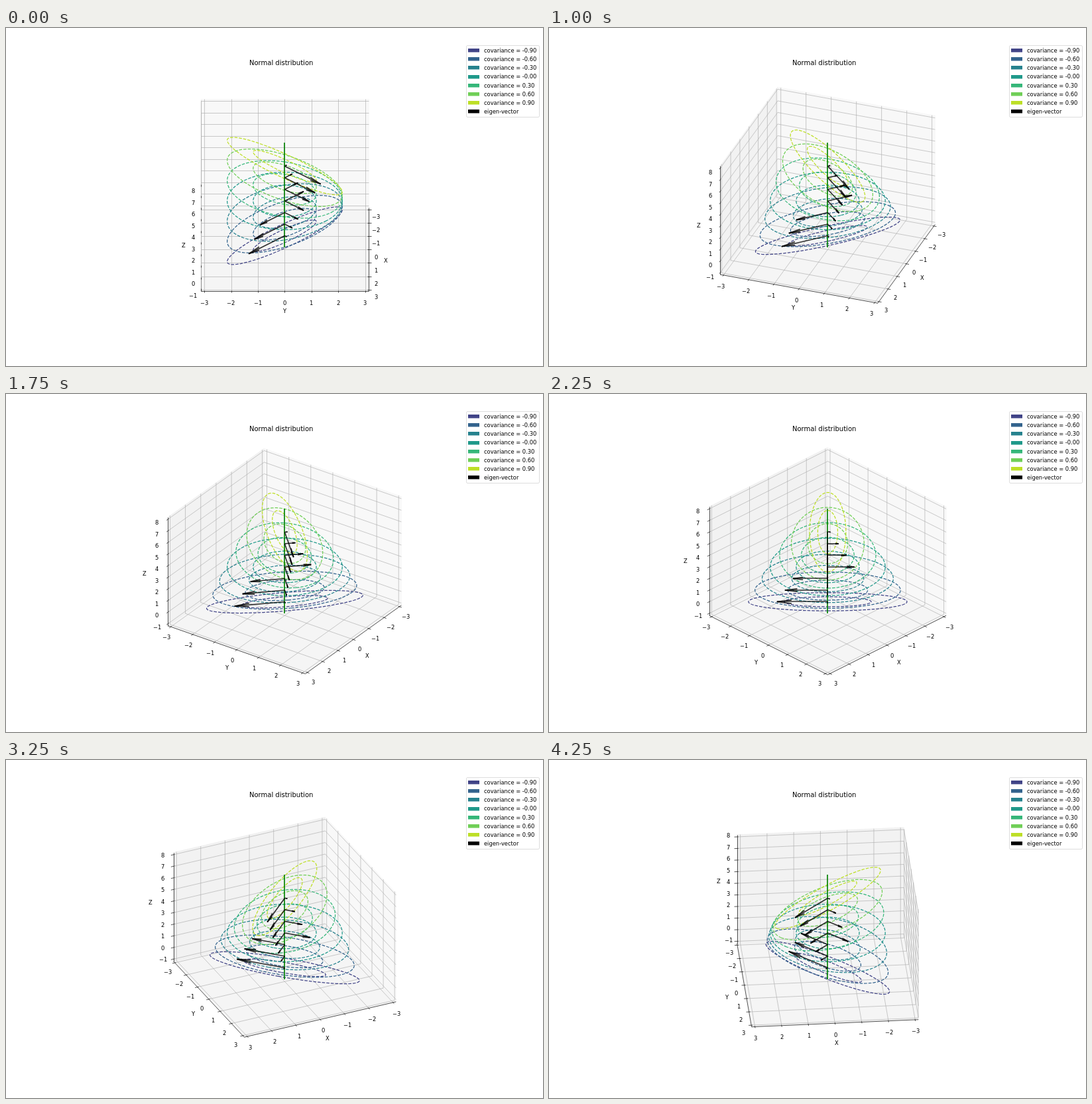
Write an HTML page with a canvas that moves like this. It is 810 px wide and 510 px high and loops after 4.5 s.

```html
<!DOCTYPE html>
<html>
<head>
<meta charset="utf-8">
<style>
html, body { margin: 0; width: 100%; height: 100%; overflow: hidden; background: #fff; }
canvas { display: block; }
</style>
</head>
<body>
<canvas id="stage" width="810" height="510"></canvas>
<script>
const ctx = document.getElementById('stage').getContext('2d');
const FONT = '"DejaVu Sans", Verdana, sans-serif';
const COLORS = ['#414487', '#33638d', '#26828e', '#1f998a', '#35b779', '#70cf57', '#bddf26'];
const COVS = [-0.9, -0.6, -0.3, 0, 0.3, 0.6, 0.9];
const RADII = [0.5, 0.9].map(p => Math.sqrt(-2 * Math.log(1 - p)));

// Orthographic camera, elevation 30 degrees
const CX = 420.43, CY = 252.2, SCALE = 40.43, Z_SCALE = 17.51;
const B = 3.125, Z_LO = -1.1875, Z_HI = 8.1875;
const TICK_GAP = 0.293, LABEL_GAP = 0.6366;
let sinA = 0, cosA = 1;

function project([x, y, z]) {
  return [CX + SCALE * (y * cosA - x * sinA),
          CY + SCALE / 2 * (x * cosA + y * sinA) - Z_SCALE * (z - 3.5)];
}

// Upright and level strokes are aligned to the pixel grid
function trace(points, width) {
  let p = points.map(project);
  const straight = p.every((q, i) => !i ||
    Math.abs(q[0] - p[i - 1][0]) < 1e-4 || Math.abs(q[1] - p[i - 1][1]) < 1e-4);
  if (straight) {
    const half = Math.round(width) % 2 / 2;
    p = p.map(q => q.map(v => Math.floor(v + 0.5) + half));
  }
  ctx.beginPath();
  p.forEach(q => ctx.lineTo(q[0], q[1]));
}

function line(points, color, width) {
  trace(points, width);
  ctx.strokeStyle = color;
  ctx.lineWidth = width;
  ctx.stroke();
}

function text(str, x, baseline, size = 8.333, centered = true) {
  ctx.font = size + 'px ' + FONT;
  ctx.fillStyle = '#000';
  const left = centered ? x - ctx.measureText(str).width / 2 : x;
  ctx.fillText(str, Math.round(left), Math.round(baseline));
}

function pane(points, shade) {
  trace(points, 0.833);
  ctx.fillStyle = ctx.strokeStyle = `rgba(${shade},${shade},${shade},0.5)`;
  ctx.lineWidth = 0.833;
  ctx.fill();
  ctx.stroke();
}

// at(v, d): point on the axis, moved d away from the box; grid(v): grid line
const AXES = [
  { name: 'X', lo: -3, hi: 3, ends: [-B, B],
    at: (v, d) => [v, B + d, Z_LO - 1.5 * d],
    tick: (v, d) => [v, B + d, Z_LO],
    grid: v => [[v, B, Z_LO], [v, -B, Z_LO], [v, -B, Z_HI]] },
  { name: 'Y', lo: -3, hi: 3, ends: [-B, B],
    at: (v, d) => [B + d, v, Z_LO - 1.5 * d],
    tick: (v, d) => [B + d, v, Z_LO],
    grid: v => [[B, v, Z_LO], [-B, v, Z_LO], [-B, v, Z_HI]] },
  { name: 'Z', lo: -1, hi: 8, ends: [Z_LO, Z_HI],
    at: (v, d) => [B + d, -B - d, v],
    tick: (v, d) => [B + d, -B, v],
    grid: v => [[-B, B, v], [-B, -B, v], [B, -B, v]] }
];

function drawAxis({ name, lo, hi, ends, at, tick, grid }) {
  line(ends.map(v => at(v, 0)), '#000', 0.667);
  const [lx, ly] = project(at((lo + hi) / 2, LABEL_GAP));
  text(name, lx, ly + 3);
  for (let v = lo; v <= hi; v++) line(grid(v), '#b0b0b0', 0.667);
  for (let v = lo; v <= hi; v++) {
    line([tick(v, -0.05), tick(v, 0.1)], '#000', 0.667);
    const [x, y] = project(at(v, TICK_GAP));
    text(String(v).replace('-', '\u2212'), x, y + 6.7);
  }
}

function drawEllipses(cov, z, color) {
  const a = Math.sqrt((1 + cov) / 2), b = Math.sqrt((1 - cov) / 2);
  ctx.setLineDash([4.625, 2]);
  for (const r of RADII) {
    const points = [];
    for (let i = 0; i <= 120; i++) {
      const t = i * Math.PI / 60, u = r * a * Math.cos(t), w = r * b * Math.sin(t);
      points.push([u - w, u + w, z]);
    }
    line(points, color, 1.25);
  }
  ctx.setLineDash([]);
}

function drawArrow(dx, dy, z) {
  const ink = 'rgba(0,0,0,0.8)', width = 1.667;
  const back = 1 - 0.3 * Math.cos(Math.PI / 12);
  const rise = 0.3 * Math.sin(Math.PI / 12) * Math.hypot(dx, dy);
  line([[0, 0, z], [dx, dy, z]], ink, width);
  for (const s of [1, -1])
    line([[dx, dy, z], [dx * back, dy * back, z + s * rise]], ink, width);
}

function drawLegend() {
  ctx.beginPath();
  ctx.roundRect(694.5, 26.5, 110, 108, 1.67);
  ctx.fillStyle = 'rgba(255,255,255,0.8)';
  ctx.strokeStyle = 'rgba(204,204,204,0.8)';
  ctx.lineWidth = 0.833;
  ctx.fill();
  ctx.stroke();
  for (let i = 0; i < 8; i++) {
    const y = 13.2 * i;
    ctx.fillStyle = COLORS[i] || '#000';
    ctx.fillRect(697, Math.round(31 + y), 17, 5.5);
    const value = i === 3 ? '-0.00' : i < 7 && COVS[i].toFixed(2);
    text(i < 7 ? 'covariance = ' + value : 'eigen-vector', 721, 36.8 + y, 8.333, false);
  }
}

function draw(now) {
  const angle = Math.floor(now % 4500 / 250) * 5 * Math.PI / 180;
  sinA = Math.sin(angle);
  cosA = Math.cos(angle);
  ctx.lineJoin = 'round';
  ctx.fillStyle = '#fff';
  ctx.fillRect(0, 0, 810, 510);

  pane([[-B, -B, Z_LO], [-B, B, Z_LO], [-B, B, Z_HI], [-B, -B, Z_HI]], 242);
  pane([[-B, -B, Z_LO], [B, -B, Z_LO], [B, -B, Z_HI], [-B, -B, Z_HI]], 230);
  pane([[-B, -B, Z_LO], [B, -B, Z_LO], [B, B, Z_LO], [-B, B, Z_LO]], 236);
  AXES.forEach(drawAxis);

  COVS.forEach((cov, z) => drawEllipses(cov, z, COLORS[z]));
  line([[0, 0, -1], [0, 0, 8]], '#008000', 1.667);
  COVS.forEach((cov, z) => {
    const major = (1 + cov) * Math.SQRT1_2;
    const minor = (1 - cov) * Math.SQRT1_2 * (cov < 0 ? -1 : 1);
    drawArrow(major, major, z);
    drawArrow(-minor, minor, z);
  });

  text('Normal distribution', 415.1, 56, 10);
  drawLegend();
}

let start;
function frame(now) {
  start ??= now;
  draw(now - start);
  requestAnimationFrame(frame);
}
draw(0);
requestAnimationFrame(frame);
</script>
</body>
</html>
```
